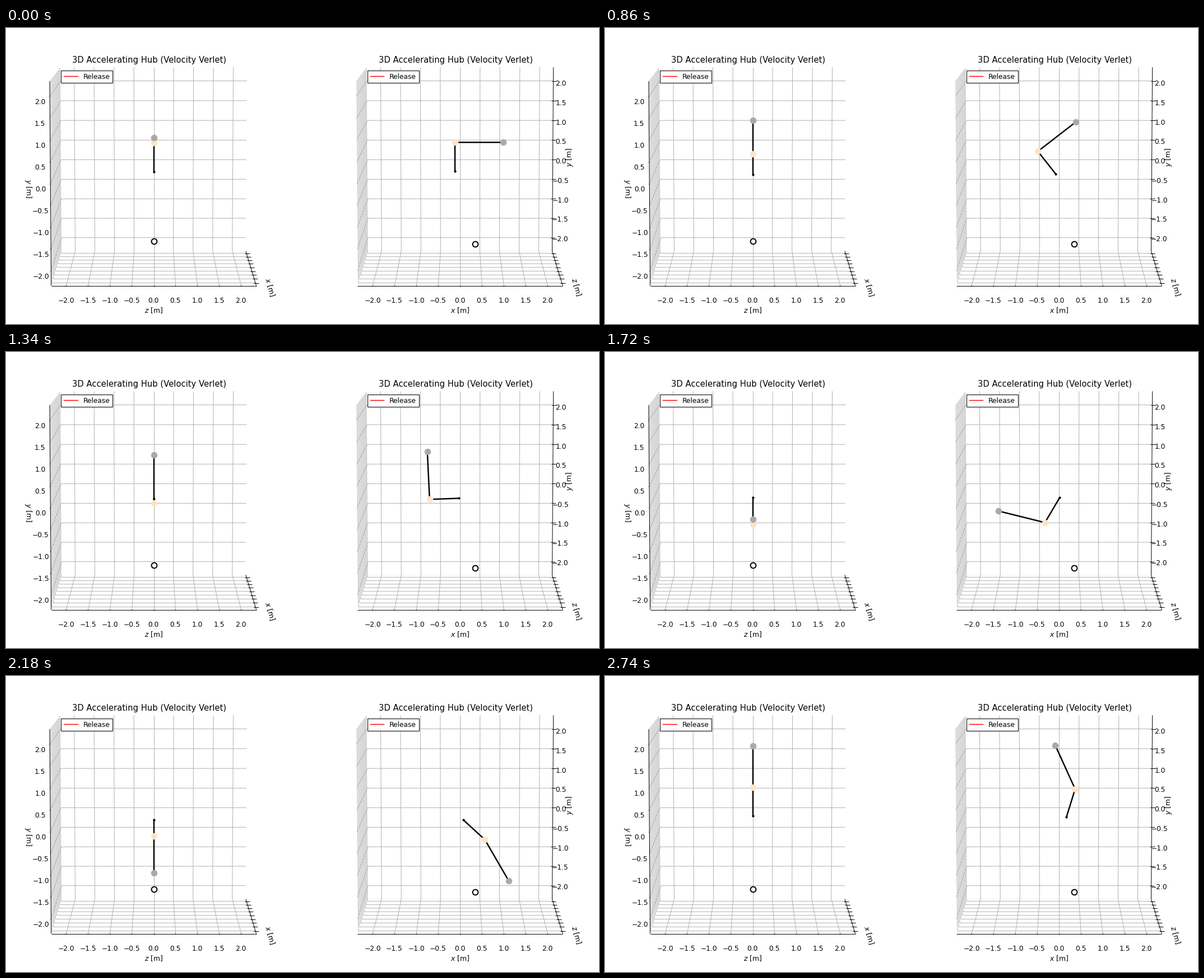
Animation, 1058 px wide and 529 px high, one loop 2.76 s. Source, as a matplotlib script:

```python
import numpy as np
import matplotlib.pyplot as plt
from matplotlib.animation import FuncAnimation
from matplotlib.collections import LineCollection
from matplotlib.patches import Rectangle

W, H = 1058, 529
FRAMES, STEP = 138, 20

B = 2.25 * 25 / 24                 # half size of the plot box in metres
TICKS = np.arange(-2, 2.1, 0.5)
K, DIST, CY = 3168.6, 18.18, 256.1
S, C = np.sin(np.radians(7.2)), np.cos(np.radians(7.2))
LEFT, RIGHT = 263.6, 810.3         # panel centres in pixels

L1, L2 = 0.70, 1.152
RING = (0.366, -1.765)

plt.rcParams["font.family"] = "DejaVu Sans"
plt.rcParams["font.size"] = 10
fig = plt.figure(figsize=(12, 6), dpi=88.167, facecolor="white")
ax = fig.add_axes([0, 0, 1, 1])
ax.set_xlim(0, W)
ax.set_ylim(H, 0)
ax.axis("off")


def project(cx, x, y, depth):
    """Perspective view; depth grows towards the viewer."""
    x, y, depth = x / B, y / B, depth / B
    d = DIST - y * S - depth * C
    return cx + K * x / d, CY - K * (y * C - depth * S) / d


def lines(cx, segments, color, width=0.8, z=1):
    pts = [[project(cx, *p) for p in seg] for seg in segments]
    ax.add_collection(LineCollection(pts, colors=color, linewidths=width,
                                     zorder=z))


def label(x, y, text, size=10):
    ax.text(x, y, text, size=size, ha="center", va="baseline")


def turned(x, y, text, angle):
    ax.text(x, y, text, rotation=angle, ha="center", va="center",
            rotation_mode="anchor")


def number(v):
    return f"{v:.1f}".replace("-", "\u2212")


def panel(cx, across, into, y_on_right):
    grid = []
    for t in TICKS:
        grid += [
            [(-B, t, B), (-B, t, -B), (B, t, -B)],
            [(t, B, -B), (t, -B, -B), (t, -B, B)],
            [(-B, B, t), (-B, -B, t), (B, -B, t)],
        ]
    if y_on_right:
        lines(cx, [[(-B, -B, -B), (B, -B, -B)]], "#eeeeee")
    lines(cx, grid, "#b0b0b0")

    spines = [[(-B, -B, B), (B, -B, B)], [(B, -B, -B), (B, -B, B)]]
    ticks = []
    for t in TICKS:
        ticks.append([(t, -B, B - 0.04), (t, -B, B + 0.08)])
        ticks.append([(B - 0.04, -B, t), (B + 0.08, -B, t)])
        if y_on_right:
            ticks.append([(B - 0.04, t, -B), (B + 0.08, t, -B)])
        else:
            ticks.append([(-B, t, B - 0.04), (-B, t, B + 0.08)])
    edge = (B, -B) if y_on_right else (-B, B)
    spines.append([(edge[0], -B, edge[1]), (edge[0], B, edge[1])])
    lines(cx, spines + ticks, "black", z=2)

    for t in TICKS:
        label(cx - 0.3 + 39 * t / 0.5, 491.3, number(t))
        if y_on_right:
            label(989.5 + 0.4 * t, 242.2 - 69.5 * t, number(t))
        else:
            label(61.5 - 0.5 * t, 292 - 78 * t, number(t))
    label(cx - 0.4, 509, f"${across}$ [m]")
    turned(cx + 207.7, 463, f"${into}$ [m]", -74)
    if y_on_right:
        turned(1005.7, 230.7, "$y$ [m]", 90)
    else:
        turned(39.3, 286.7, "$y$ [m]", -90)

    label(cx - 8, 62, "3D Accelerating Hub (Velocity Verlet)", 12)
    x0 = cx - 165.3
    ax.add_patch(Rectangle((x0, 76.3), 92, 21.7, fc="white", ec="#222222",
                           lw=1, zorder=4))
    ax.plot([x0 + 4.9, x0 + 29.4], [86.5, 86.5], color="red", lw=1.2, zorder=5)
    ax.text(x0 + 39.2, 91, "Release", va="baseline", zorder=5)


def hermite(t, keys):
    """Cubic through (time, value, slope) keys."""
    for (t0, a, va), (t1, b, vb) in zip(keys, keys[1:]):
        if t <= t1:
            break
    h = t1 - t0
    s = (t - t0) / h
    return ((2 * s**3 - 3 * s**2 + 1) * a + (s**3 - 2 * s**2 + s) * h * va
            + (3 * s**2 - 2 * s**3) * b + (s**3 - s**2) * h * vb)


ARM = [(1.34, 92.1, 137.5), (1.72, 149.7, 158),
       (2.18, 227.3, 183), (2.74, 343, 226)]
BEND = [(1.72, -73.8, 88.4), (2.18, -17.4, 151), (2.74, 41.3, 15)]


def pose(t):
    """Hub, joint and mass in the x-y plane at t seconds."""
    turn = 51.3 * t * t if t < 1.34 else hermite(t, ARM)
    if t < 1.72:
        bend = -90 + 16.2 * (max(t - 1.17, 0) / 0.55) ** 3
    else:
        bend = hermite(t, BEND)
    a = np.radians(90 + turn)
    b = a + np.radians(bend)
    hub = np.array([-0.125 + 0.027 * t + 0.0304 * t * t,
                    -0.128 * t + 0.055 * t * t])
    joint = hub + L1 * np.array([np.cos(a), np.sin(a)])
    mass = joint + L2 * np.array([np.cos(b), np.sin(b)])
    return hub, joint, mass


def side(p):
    return project(LEFT, 0, p[1], -p[0])


def front(p):
    return project(RIGHT, p[0], p[1], 0)


def dot(color, size, z):
    return ax.plot([], [], "o", color=color, ms=size, mew=0, zorder=z)[0]


panel(LEFT, "z", "x", False)
panel(RIGHT, "x", "z", True)

views = []
for view in (side, front):
    ax.plot(*[[v] for v in view(RING)], "o", mfc="white", mec="black", ms=8,
            mew=1.6, zorder=6)
    rod = ax.plot([], [], color="black", lw=2, zorder=7)[0]
    views.append((view, rod, [dot("black", 3.4, 8), dot("bisque", 9.4, 9),
                              dot("darkgray", 9.4, 10)]))


def update(i):
    points = pose(i * STEP / 1000)
    changed = []
    for view, rod, dots in views:
        spots = [view(p) for p in points]
        rod.set_data(*zip(*spots))
        for d, (x, y) in zip(dots, spots):
            d.set_data([x], [y])
        changed += [rod, *dots]
    return changed


anim = FuncAnimation(fig, update, frames=FRAMES, interval=STEP,
                     init_func=lambda: update(0), repeat=True, repeat_delay=0)
plt.show()
```
